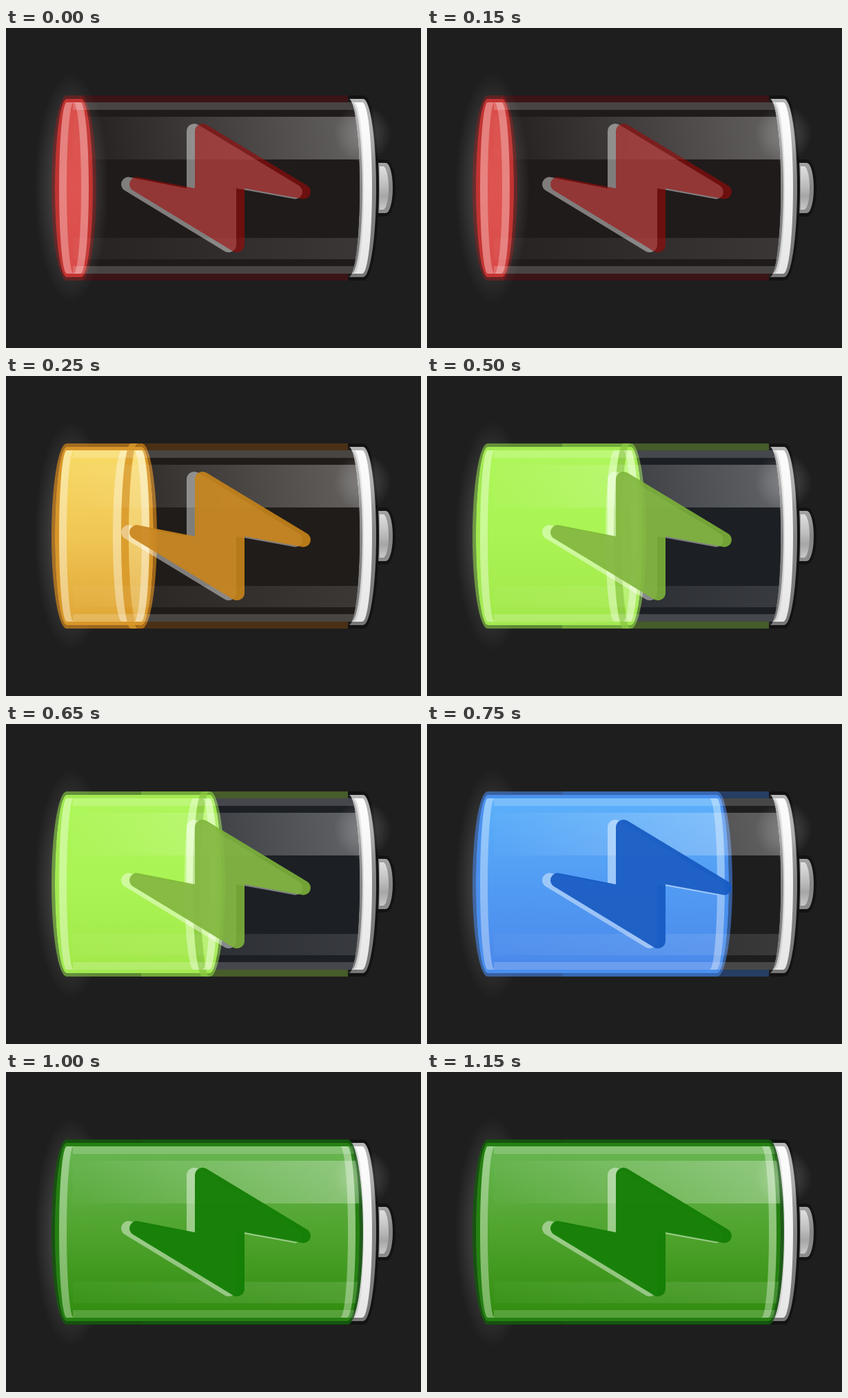
Write an HTML page with a canvas that moves like this. It is 602 by 465 pixels and loops after 1.25 s.

```html
<!DOCTYPE html>
<html lang="en">
<head>
<meta charset="utf-8">
<title>Battery charging</title>
<style>
html, body { margin: 0; width: 100%; height: 100%; overflow: hidden; background: #1e1e1e; }
canvas { display: block; }
</style>
</head>
<body>
<canvas id="stage" width="602" height="465"></canvas>
<script>
const ctx = document.getElementById('stage').getContext('2d');
const W = 602, H = 465, MID = 232.5, STEP = 250;

// One entry per charge level; `right` is the far end of the liquid.
const levels = [
  { right: 131, bandFrom: 108, body: '#1f1b1a', band: '#3b1416', edge: 'rgba(160,25,25,.45)',
    rim: '#c23432', fill: ['#d94e4a', '#de5450', '#d94a48'], bolt: 'rgb(160,8,8)', boltAlpha: .6, shine: .28 },
  { right: 219, bandFrom: 190, body: '#201c19', band: '#4a3015', edge: 'rgba(225,140,25,.65)',
    rim: '#d8962a', fill: ['#f8da66', '#f0c654', '#dfa636'], bolt: 'rgb(200,132,26)', boltAlpha: .9, shine: .38,
    lens: 168, ring: 'rgba(217,152,40,.85)' },
  { right: 318, bandFrom: 196, body: '#1c1f24', band: '#465c2a', edge: 'rgba(158,246,74,.5)',
    rim: '#a3ea52', fill: ['#aef65a', '#aaf454', '#a2e84a'], bolt: 'rgb(126,180,58)', boltAlpha: .89, shine: .38,
    lens: 272, ring: 'rgba(138,200,66,.8)' },
  { right: 443, bandFrom: 196, body: '#1e1e1e', band: '#263e64', edge: 'rgba(66,126,220,.65)',
    rim: '#4a90ee', fill: ['#5cb0fa', '#529cf4', '#4a88ea'], bolt: 'rgb(22,90,194)', boltAlpha: .93, shine: .35 },
  { right: 518, bandFrom: 196, body: '#1e1e1e', band: '#164f10', edge: 'rgba(20,86,14,.9)',
    rim: '#258012', fill: ['#68b652', '#50a42e', '#308c0e'], bolt: 'rgb(20,126,6)', boltAlpha: .96, shine: .35 }
];

// Upright band from (left, top) to (right, top), mirrored below; its sides bow by lBow and rBow.
function barrel(left, right, top, lBow, rBow) {
  const p = new Path2D(), h = MID - top, q = Math.PI / 2;
  p.ellipse(right, MID, Math.abs(rBow), h, 0, -q, q, rBow < 0);
  p.ellipse(left, MID, Math.abs(lBow), h, 0, q, -q, lBow > 0);
  p.closePath();
  return p;
}

function paint(path, style) {
  ctx.fillStyle = style;
  ctx.fill(path);
}

function rect(x, y, w, h, style) {
  ctx.fillStyle = style;
  ctx.fillRect(x, y, w, h);
}

function linear(x0, y0, x1, y1, colors) {
  const g = ctx.createLinearGradient(x0, y0, x1, y1);
  colors.forEach((c, i) => g.addColorStop(i / (colors.length - 1), c));
  return g;
}

const white = a => `rgba(255,255,255,${a})`;

function glow(x, y, rx, ry, alpha) {
  const g = ctx.createRadialGradient(0, 0, 0, 0, 0, 1);
  g.addColorStop(0, white(alpha));
  g.addColorStop(.5, white(alpha * .6));
  g.addColorStop(1, white(0));
  ctx.save();
  ctx.translate(x, y);
  ctx.scale(rx, ry);
  rect(-1, -1, 2, 2, g);
  ctx.restore();
}

const bolt = new Path2D(`M274 150A11 11 0 0 1 290.7 140.6L436.9 229A10.5 10.5 0 0 1 429.6 248.3
  L346 233V315A11 11 0 0 1 329.3 324.4L184.1 236A10.5 10.5 0 0 1 191.4 216.7L274 233Z`);
const inside = barrel(88, 497, 98, -22, 16);

function drawCap() {
  paint(barrel(533, 551, 191, 0, 14), '#131313');
  paint(barrel(536, 551, 196, 0, 10), linear(0, 196, 0, 269, ['#a4a4a4', '#858585', '#8c8c8c']));
  paint(barrel(536, 547, 201, 0, 8), linear(0, 196, 0, 269, ['#e4e4e4', '#c9c9c9', '#a6a6a6', '#d2d2d2']));
  rect(536, 201, 6, 63, 'rgba(95,95,95,.45)');
  paint(barrel(496, 519, 98, 0, 22), '#131313');
  paint(barrel(497, 518, 103, 16, 19), linear(0, 103, 0, 362, ['#b6b6b6', '#858585', '#777777']));
  paint(barrel(501, 517, 108, 16, 14), linear(0, 108, 0, 357, ['#fcfcfc', '#f2f2f2', '#e6e6e6']));
  paint(barrel(501, 505, 108, 14, 14), 'rgba(140,140,140,.25)');
}

function drawBody(s) {
  paint(barrel(109, 497, 103, -22, 16), s.body);
  for (const y of [98, 357]) rect(s.bandFrom, y, 496 - s.bandFrom, 10, s.band);
}

function drawLiquid(s) {
  const end = s.right - 22;
  const rim = barrel(88, end, 103, -17, 17);
  const edge = barrel(88, end, 98, -22, 22);
  edge.addPath(rim);
  ctx.fillStyle = s.edge;
  ctx.fill(edge, 'evenodd');
  paint(rim, s.rim);
  paint(barrel(88, end, 108, -11, 11), linear(0, 108, 0, 357, s.fill));
  if (s.lens) {
    paint(barrel(s.lens, s.lens + 10, 108, -13, -11), white(s.shine));
    paint(barrel(s.lens + 13, s.lens + 23, 98, -14, -13), s.ring);
    paint(barrel(s.lens + 23, end - 1, 108, -13, 12), white(.16));
  }
  paint(barrel(88, 98, 108, -11, -10), white(s.shine));
  paint(barrel(end - 11, end - 1, 108, 11, 12), white(s.shine));
}

function drawGloss() {
  ctx.save();
  ctx.clip(inside);
  rect(97, 108, 420, 11, white(.18));
  rect(97, 346, 420, 11, white(.18));
  rect(97, 129, 420, 62, linear(110, 190, 512, 140, [white(.02), white(.16), white(.3)]));
  rect(97, 305, 420, 31, linear(97, 0, 512, 0, [white(.03), white(.12)]));
  ctx.restore();
}

function drawBolt(s) {
  ctx.save();
  ctx.translate(-12, 0);
  paint(bolt, white(.43));
  ctx.restore();
  ctx.save();
  ctx.globalAlpha = s.boltAlpha;
  paint(bolt, s.bolt);
  ctx.restore();
}

function draw(s) {
  rect(0, 0, W, H, '#1e1e1e');
  drawCap();
  drawBody(s);
  glow(95, MID, 54, 168, .24);
  drawLiquid(s);
  drawGloss();
  glow(517, 154, 42, 42, .2);
  drawBolt(s);
}

let shown = -1;
function tick() {
  const i = Math.floor(performance.now() / STEP) % levels.length;
  if (i !== shown) draw(levels[shown = i]);
  requestAnimationFrame(tick);
}
tick();
</script>
</body>
</html>
```
